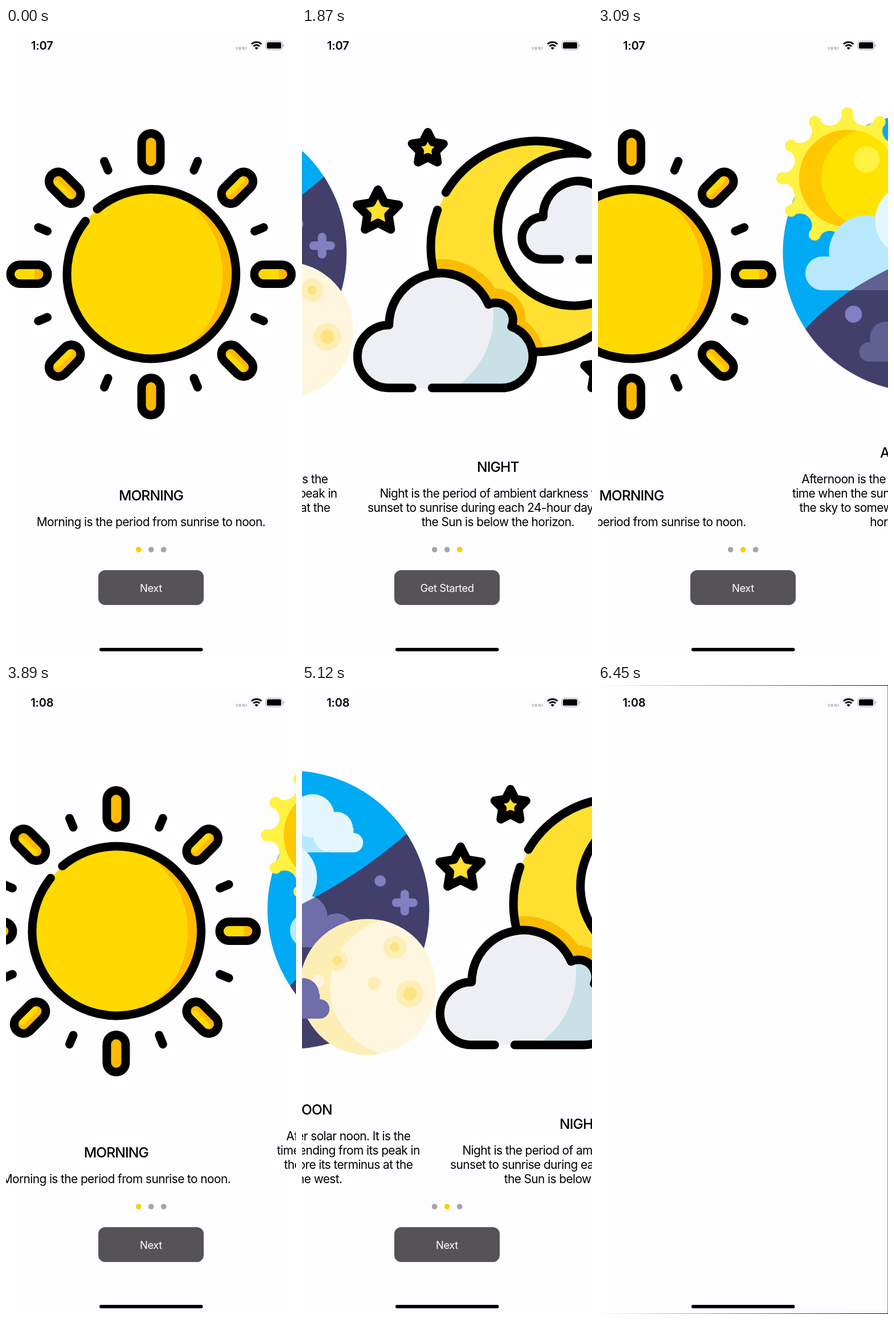
Animation, 509 px wide and 1101 px high, one loop 6.73 s. Source, as an HTML page:

```html
<!DOCTYPE html>
<html lang="en">
<head>
<meta charset="utf-8">
<title>Times of day</title>
<style>
  html, body { margin: 0; width: 100%; height: 100%; overflow: hidden; background: #000; }
  #screen, svg { position: absolute; left: 0; top: 0; width: 509px; height: 1101px; }
  #screen { background: #fefdff; }
  svg { overflow: hidden; }
  text { font: 20.9px Inter, "Liberation Sans", sans-serif; letter-spacing: -.6px; text-anchor: middle; }
  .title { font-size: 24.6px; font-weight: 500; letter-spacing: -.9px; }
  #label { font-size: 18.4px; letter-spacing: -.45px; fill: #fff; }
  #clock { font-size: 20px; font-weight: 600; letter-spacing: -.2px; }
  .a { fill: var(--a); }
  .b { fill: var(--b); }
  .day { --a: #b8e8fb; --b: #e4f6fd; }
  .dusk { --a: #625f93; --b: #706dab; }
  .ink { fill: none; stroke: #000; stroke-width: 15; stroke-linecap: round; stroke-linejoin: round; }
</style>
</head>
<body>
<div id="screen">
  <svg id="content">
    <g id="pages"></g>
    <g id="dots"></g>
    <rect x="162" y="949" width="185" height="61" rx="12" fill="#565356"/>
    <text id="label" x="254.5" y="986.5"></text>
  </svg>
</div>
<svg>
  <text id="clock" x="63.3" y="37.5"></text>
  <path d="M404 35.5h19" stroke="#c9c7cb" stroke-width="5" stroke-dasharray="5 1.5" stroke-dashoffset="2.5"/>
  <path d="M431 28.2a12.4 12.4 0 0 1 17.4 0M434.2 32a7.8 7.8 0 0 1 11 0" fill="none" stroke="#000" stroke-width="3"/>
  <path d="M439.7 38l-3.2-3.2a4.5 4.5 0 0 1 6.4 0z"/>
  <rect x="456" y="23" width="29" height="15" rx="4.5" fill="none" stroke="#99979b"/>
  <rect x="458" y="25" width="25" height="11" rx="2.6"/>
  <path d="M486.5 28a3 3 0 0 1 0 5z" fill="#99979b"/>
  <rect x="164" y="1085" width="181.5" height="6" rx="3"/>
</svg>
<script>
const W = 509, CX = W / 2;
const $ = id => document.getElementById(id);
const polar = (x, y, r, deg) => {
  const a = deg * Math.PI / 180;
  return [x + r * Math.cos(a), y + r * Math.sin(a)];
};
const circle = (x, y, r, fill) => `<circle cx="${x}" cy="${y}" r="${r}" fill="${fill}"/>`;
const path = (d, fill) => `<path d="${d}" fill="${fill}"/>`;
const ink = d => `<path class="ink" d="${d}"/>`;
const bar = (p, q, width, color) =>
  `<path d="M${p}L${q}" stroke="${color}" stroke-width="${width}" stroke-linecap="round"/>`;

function caption(title, lines) {
  const top = 872 - 24.9 * (lines.length - 1);
  return `<text class="title" x="${CX}" y="${top - 45.3}">${title}</text>` +
    lines.map((line, i) => `<text x="${CX}" y="${top + 24.9 * i}">${line}</text>`).join('');
}

function morning() {
  const cy = 431, yellow = '#ffd900', orange = '#ffb900';
  let rays = '';
  for (let k = 0; k < 8; k++) {
    const deg = 45 * k, at = r => polar(CX, cy, r, deg);
    rays += bar(at(198), at(230), 48, '#000') + bar(at(198), at(230), 18, orange);
    if (k % 2) {
      const [c, s] = polar(0, 0, 4, deg);
      const left = r => { const [x, y] = at(r); return [x - Math.abs(s), y + c * Math.sign(s)]; };
      rays += bar(left(198), left(230), 10, yellow);
    }
    rays += bar(polar(CX, cy, 197, deg + 22.5), polar(CX, cy, 214, deg + 22.5), 15, '#000');
  }
  return rays +
    path('M50 422H24a9 9 0 0 0 0 18H50zM479 422H452a9 9 0 0 0 0 18H479z', yellow) +
    circle(CX, cy, 147, orange) +
    path('M296 290A160 160 0 0 1 296 572A147 147 0 1 1 296 290', yellow) +
    ink('M160 317A148.3 148.3 0 1 1 139.5 338') +
    caption('MORNING', ['Morning is the period from sunrise to noon.']);
}

function afternoon() {
  const dusk = '#827fc2', cream = '#fff6df', sand = '#fdeeb5', gold = '#fde27f';
  let corona = '';
  for (let deg = 0; deg < 360; deg += 30) {
    const from = polar(146, 263, 110, deg - 5), to = polar(146, 263, 110, deg + 5);
    corona += (deg ? `A21 21 0 0 0 ${from}` : `M${from}`) + `A10.5 10.5 0 1 1 ${to}`;
  }
  corona += `A21 21 0 0 0 ${polar(146, 263, 110, -5)}z`;
  const crater = (x, y, r, core) => circle(x, y, r, sand) + circle(x, y, core, gold);
  return `<defs>
      <clipPath id="disc"><circle cx="276.5" cy="393.5" r="243.5"/></clipPath>
      <clipPath id="shade"><path d="M73 526C190 402 300 416 481 260L560 300V700H0z"/></clipPath>
      <g id="puff">
        <path class="a" d="M243 293a17 17 0 0 1 0 -34H340V293z"/><circle class="a" cx="273" cy="251" r="28"/>
        <circle class="b" cx="315.5" cy="229" r="38"/><circle class="b" cx="357" cy="251" r="29"/>
        <path class="b" d="M316 262A31 31 0 0 0 347 293H387a17 17 0 0 0 0 -34V250H316z"/>
      </g>
      <g id="cloud">
        <path class="a" d="M102 459a29.5 29.5 0 0 1 0 -59H290V459z"/><circle class="a" cx="179" cy="393" r="65"/>
        <circle class="b" cx="259" cy="337" r="64"/><circle class="b" cx="301" cy="407" r="40"/>
        <circle class="b" cx="357" cy="430" r="29.5"/>
        <path class="b" d="M231 394V405A54 54 0 0 0 285 459H370V420H300V394z"/>
      </g>
    </defs>
    <g transform="translate(-22)">` +
    circle(276.5, 393.5, 243.5, '#00aaf4') +
    `<g clip-path="url(#disc)"><rect width="560" height="700" fill="#423f6b" clip-path="url(#shade)"/></g>
    <use href="#puff" class="day"/>` +
    path(corona, '#fff242') +
    circle(146.5, 263, 85, '#ffc800') +
    path('M167 180A85 85 0 0 0 167 346A85 85 0 0 0 167 180', '#ffe300') +
    circle(180, 230, 23, '#fff242') +
    `<use href="#cloud" class="day"/>
    <g clip-path="url(#shade)"><use href="#cloud" class="dusk"/></g>` +
    circle(434, 343, 10, dusk) + circle(157, 501, 15, dusk) + circle(270, 617.5, 10, dusk) +
    bar([477, 366], [477, 396], 15, dusk) + bar([462, 381], [492, 381], 15, dusk) +
    circle(411.5, 528.5, 119, sand) +
    path('M437 412A120 120 0 0 0 437 645A119 119 0 0 0 437 412', cream) +
    crater(459.5, 459, 20, 8) + crater(486, 540.5, 24, 12) + crater(358, 482, 19, 8) +
    circle(423, 522, 11.5, sand) + circle(325, 518, 11, cream) +
    `<use href="#puff" class="dusk" x="-59" y="291"/></g>` +
    caption('AFTERNOON', [
      'Afternoon is the time after solar noon. It is the',
      'time when the sun is descending from its peak in',
      'the sky to somewhat before its terminus at the',
      'horizon in the west.']);
}

function night() {
  const yellow = '#ffdf30', pale = '#eeeff4', blue = '#c8e0e6', amber = '#fabc00';
  const star = (x, y, r) => {
    const points = Array.from({ length: 10 }, (_, i) => polar(x, y, i % 2 ? r * .51 : r, 36 * i - 90));
    const d = `M${points.join('L')}z`;
    return path(d, yellow) + ink(d);
  };
  const inner = 'A133.5 133.5 0 1 1 411.4 221.2';
  const moon = 'M411.4 221.2A184 184 0 1 0 502 422' + inner;
  const bigEdge = 'A55 55 0 0 0 278.5 523A30 30 0 0 0 238 484';
  const big = `M139 630H258.5${bigEdge}A91 91 0 0 0 63.5 520A55 55 0 0 0 62.5 630H104`;
  const smallEdge = 'A37 37 0 0 0 479 332A20 20 0 0 0 451.5 306';
  const small = `M398 405H465${smallEdge}A61 61 0 0 0 334 330.5A37 37 0 0 0 333.5 405H363`;
  return `<clipPath id="moon"><path d="${moon}"/></clipPath>` +
    path(moon, yellow) +
    '<g clip-path="url(#moon)">' +
    circle(154.7, 519.6, 115, amber) + circle(250, 509, 53, amber) + circle(258, 576, 77, amber) + '</g>' +
    ink('M411.4 221.2A184 184 0 0 0 163 288M148.5 318.4A184 184 0 0 0 322 567A184 184 0 0 0 502 422' + inner) +
    path(big, pale) + path(`M246 488A150 150 0 0 1 178 630H258.5${bigEdge}z`, blue) + ink(big) +
    path(small, pale) + path(`M456 308A105 105 0 0 1 412 405H465${smallEdge}z`, blue) + ink(small) +
    star(44, 321.5, 38.4) + star(131.5, 211.5, 29) + star(439.8, 601.5, 35) +
    caption('NIGHT', [
      'Night is the period of ambient darkness from',
      'sunset to sunrise during each 24-hour day, when',
      'the Sun is below the horizon.']);
}

$('pages').innerHTML = [morning, afternoon, night]
  .map((draw, i) => `<g transform="translate(${W * i})">${draw()}</g>`).join('');
$('dots').innerHTML = [232.7, 254.7, 276.7].map(x => circle(x, 913, 4.8, '#a8a5aa')).join('');

// start, end, from page, to page, lead-in (ms), button press or swipe
const moves = [
  [1330, 1390, 0, 1, 17, true],
  [1760, 1920, 1, 2, 40, true],
  [2240, 2670, 2, 1, 87, false],
  [2990, 3470, 1, 0, 41, false],
  [3890, 4370, 0, 1, 54, false],
  [5010, 5550, 1, 2, 25, false],
];
const LOOP = 6730, FLIP = [6030, 6450];
const smooth = x => { x = Math.min(1, Math.max(0, x)); return x * x * (3 - 2 * x); };

function elapsed(t, start, end) {
  if (t >= end) return end - start;
  const step = (end - start) / Math.round((end - start) / 53.5);
  return Math.floor((t - start + 7) / step) * step;
}

function render(t) {
  let scroll = 0, active = 0, fading = -1;
  for (const [start, end, from, to, lead, press] of moves) {
    if (t < start) break;
    const u = elapsed(t, start, end);
    const p = t >= end ? 1
      : press ? smooth((u + lead) / (end - start + lead))
      : 1 - Math.exp(-(((u + lead) / 151) ** 2));
    scroll = from + (to - from) * p;
    active = press || t >= end - 60 ? to : from;
    fading = press && u === 0 ? from : -1;
  }
  $('pages').setAttribute('transform', `translate(${-W * scroll})`);
  [...$('dots').children].forEach((dot, i) =>
    dot.setAttribute('fill', i === active ? '#fecb00' : i === fading ? '#d8b742' : '#a8a5aa'));
  $('label').textContent = active === 2 ? 'Get Started' : 'Next';
  $('clock').textContent = t < 3890 ? '1:07' : '1:08';

  const turn = t < FLIP[0] ? 0 : 180 * smooth((elapsed(t, ...FLIP) + 46) / 477);
  const back = turn > 90;
  const depth = CX * Math.sin(turn * Math.PI / 180);
  $('content').style.visibility = back ? 'hidden' : 'visible';
  $('screen').style.transform = turn
    ? `perspective(1400px) translateZ(${-depth}px) rotateY(${back ? 180 - turn : -turn}deg)` : 'none';
}

const origin = performance.now();
function tick() {
  render((performance.now() - origin) % LOOP);
  requestAnimationFrame(tick);
}
tick();
</script>
</body>
</html>
```
